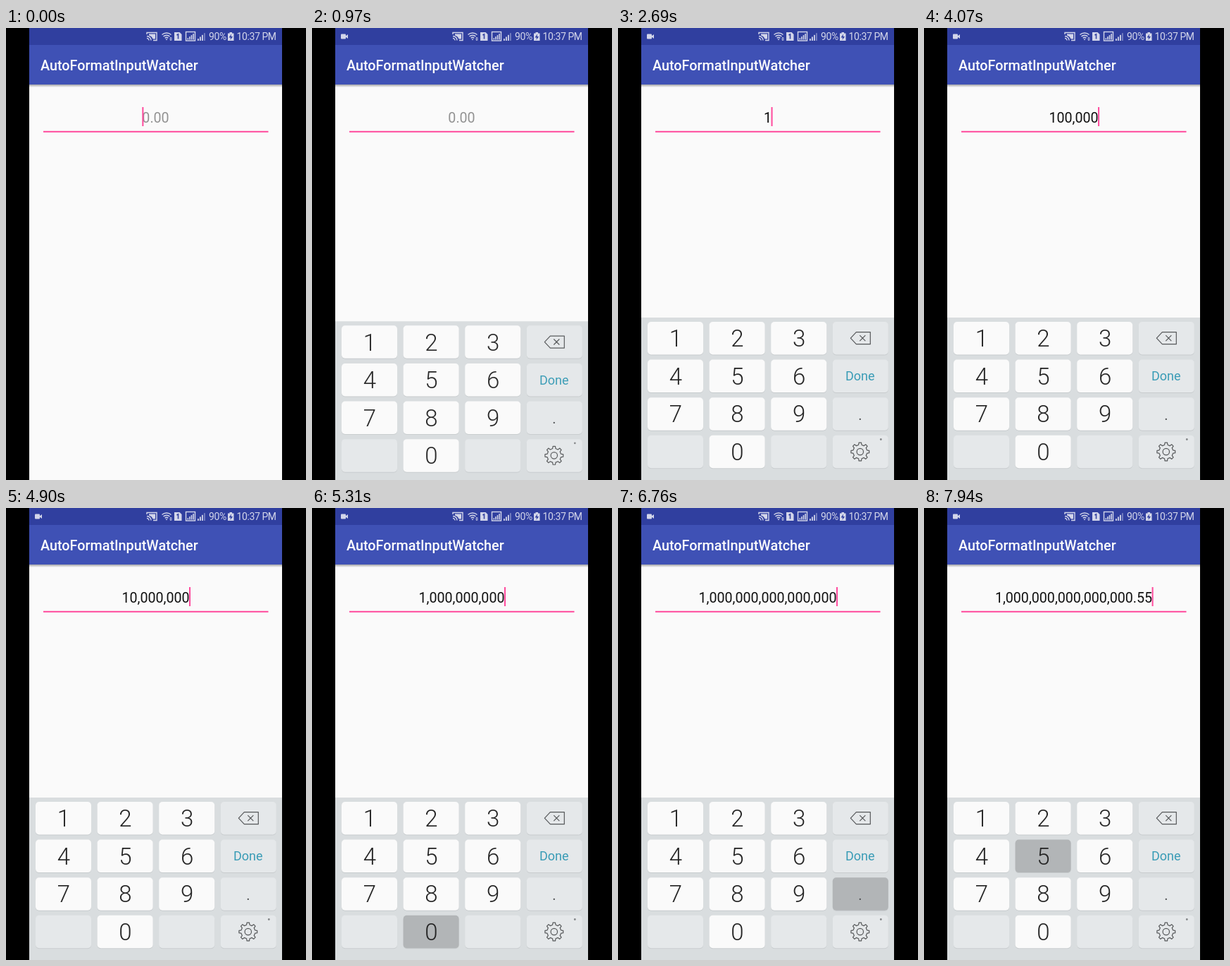
Write an HTML page that moves like this. It is 426 px wide and 640 px high and loops after 8000 ms.

```html
<!DOCTYPE html>
<html lang="en">
<head>
<meta charset="utf-8">
<title>AutoFormatInputWatcher</title>
<style>
  html, body { margin: 0; width: 100%; height: 100%; overflow: hidden; background: #000; }
  svg { display: block; width: 426px; height: 640px; }
  text { font-family: Roboto, sans-serif; }
  .status { font-size: 14px; letter-spacing: -.4px; fill: #d3d6ea; }
  .title { font-size: 19.8px; font-weight: 500; fill: #fcfcfc; }
  .mid { text-anchor: middle; }
  .digit { font-size: 33px; font-weight: 300; fill: #252525; }
  .done { font-size: 18px; fill: #3a9cb6; }
  .point { font-size: 20px; fill: #4a4c4e; }
  .line { fill: none; stroke: #56585a; stroke-width: 1.2; stroke-linejoin: round; }
  .icon { fill: none; stroke: #d3d6ea; stroke-width: 1.4; }
  .solid { fill: #d3d6ea; }
  .accent { fill: #ff4a9c; }
</style>
</head>
<body>
<svg viewBox="0 0 426 640">
  <defs>
    <linearGradient id="shade" x2="0" y2="1">
      <stop offset="0" stop-color="#85858a" stop-opacity=".75"/>
      <stop offset="1" stop-color="#85858a" stop-opacity="0"/>
    </linearGradient>
    <clipPath id="screen"><rect x="33" width="359" height="640"/></clipPath>
  </defs>
  <rect width="426" height="640"/>
  <g clip-path="url(#screen)">
    <rect x="33" width="359" height="640" fill="#fafafa"/>
    <rect x="33" width="359" height="24" fill="#303f9f"/>
    <rect x="33" y="24" width="359" height="56" fill="#3f51b5"/>
    <rect x="33" y="80" width="359" height="4" fill="url(#shade)"/>

    <g id="camera" class="solid">
      <rect x="41" y="8.5" width="7" height="7" rx="1"/>
      <path d="M47 12l4-3v6z"/>
    </g>
    <path class="icon" d="M200 9V6.5h14v11h-5M200 11.5a6 6 0 0 1 6 6M200 14.5a3 3 0 0 1 3 3"/>
    <path class="solid" d="M203 8.5h9v7h-3.5a8 8 0 0 0-5.5-5z"/>
    <path class="icon" d="M221.5 9.5a9.5 9.5 0 0 1 13 0M223.5 12a6.5 6.5 0 0 1 9 0M225.7 14.3a3.5 3.5 0 0 1 4.6 0"/>
    <path class="solid" d="M226.5 15.5h3l-1.5 2zM232 15l2-2 2 2zM232 16l2 2 2-2z"/>
    <path class="solid" d="M239 6h7.5l3 3v9H239z"/>
    <path d="M242.5 10l2-1.2V15.5" fill="none" stroke="#303f9f" stroke-width="1.5"/>
    <rect class="icon" x="255.5" y="5.5" width="13" height="12.5" stroke-width="1"/>
    <g id="bars" class="solid"></g>
    <text class="status" x="288" y="17">90%</text>
    <path class="solid" d="M317.5 6h3.5v1.5h2.5V18h-8.5V7.5h2.5z"/>
    <path d="M320 8.5l-3.5 5h2.5l-.5 3.5 3.5-5h-2.5z" fill="#303f9f"/>
    <text class="status" x="327.5" y="17">10:37 PM</text>

    <text class="title" x="49" y="60">AutoFormatInputWatcher</text>
    <text id="field" class="mid" x="212.5" y="133.5" font-size="19.65"></text>
    <rect class="accent" x="53" y="145.8" width="319.5" height="2"/>
    <rect id="caret" class="accent" y="112" width="2" height="27"/>

    <g id="pad">
      <rect x="33" y="410" width="359" height="300" fill="#d9dddf"/>
    </g>
  </g>
</svg>
<script>
const LOOP = 8000, MID = 212.5;
const $ = id => document.getElementById(id);

// key, pressed, committed, released
const TAPS = [
  ['1', 2140, 2210, 2280], ['0', 2760, 2830, 2900], ['0', 3040, 3100, 3170],
  ['0', 3240, 3240, 3310], ['0', 3800, 3870, 3930], ['0', 4000, 4000, 4070],
  ['0', 4140, 4280, 4350], ['0', 4560, 4560, 4900], ['0', 4970, 5040, 5110],
  ['0', 5170, 5170, 5240], ['0', 5310, 5590, 5660], ['0', 5730, 5730, 5800],
  ['0', 5860, 5860, 5930], ['0', 6000, 6000, 6070], ['0', 6210, 6280, 6420],
  ['0', 6490, 6550, 6690], ['.', 6760, 6900, 6970], ['5', 7520, 7590, 7660],
  ['5', 7800, 7940, 8000]
];
const CARET_OFF = [[480, 1040], [1590, 2140], [3800, 3870], [7520, 7590]];
const ROWS = ['123<', '456D', '789.', ' 0 *'];

function add(parent, tag, attrs, text) {
  const el = document.createElementNS('http://www.w3.org/2000/svg', tag);
  for (const k in attrs) el.setAttribute(k, attrs[k]);
  if (text) el.textContent = text;
  return parent.appendChild(el);
}

function gearPath(cx, cy) {
  const pts = [];
  for (let i = 0; i < 8 * 4; i++) {
    const r = i % 4 < 2 ? 13 : 10;
    const a = (Math.floor(i / 4) + [-.17, .17, .28, .72][i % 4]) * Math.PI / 4 - Math.PI / 2;
    pts.push((cx + r * Math.cos(a)).toFixed(1) + ' ' + (cy + r * Math.sin(a)).toFixed(1));
  }
  return 'M' + pts.join('L') + 'Z';
}

function drawLabel(pad, label, cx, cy) {
  if (label === '<') {
    add(pad, 'path', { class: 'line', d: `M${cx - 14} ${cy}l8-8.5h20v17h-20zM${cx - 1} ${cy - 4}l8 8m0-8l-8 8` });
  } else if (label === '*') {
    add(pad, 'path', { class: 'line', d: gearPath(cx - .5, cy) });
    add(pad, 'circle', { class: 'line', cx: cx - .5, cy, r: 4.7 });
    add(pad, 'circle', { cx: cx + 29, cy: cy - 17.5, r: 1.4, fill: '#85878a' });
  } else if (label === 'D') {
    add(pad, 'text', { class: 'mid done', x: cx - .5, y: cy + 6.5 }, 'Done');
  } else if (label === '.') {
    add(pad, 'text', { class: 'mid point', x: cx - .5, y: cy + 8.5 }, '.');
  } else if (label !== ' ') {
    add(pad, 'text', { class: 'mid digit', x: cx + .4, y: cy + 12 }, label);
  }
}

const keys = {};
const baseFill = label => /\d/.test(label) ? '#fafafa' : '#e5e8ea';

ROWS.forEach((row, r) => [...row].forEach((label, c) => {
  const x = 42 + c * 87.6, y = 416 + r * 53.6;
  const box = { x, y, width: 79, height: 46.5, rx: 5 };
  add($('pad'), 'rect', { ...box, y: y + 1, fill: '#c8ccce' });
  const cap = add($('pad'), 'rect', { ...box, fill: baseFill(label) });
  if (label !== ' ') keys[label] = cap;
  drawLabel($('pad'), label, x + 39.5, y + 23.2);
}));

for (let i = 0; i < 4; i++) {
  const h = 2.5 + i * 2.3;
  add($('bars'), 'rect', { x: 257.5 + i * 2.6, y: 16.5 - h * .9, width: 1.6, height: h * .9 });
  add($('bars'), 'rect', { x: 272 + i * 3, y: 18 - h * 1.15, width: 1.8, height: h * 1.15, opacity: i > 2 ? .45 : 1 });
}

function format(raw) {
  const [whole, ...rest] = raw.split('.');
  return [whole.replace(/\B(?=(\d{3})+$)/g, ','), ...rest].join('.');
}

let shown = null;
function setField(raw) {
  if (raw === shown) return;
  shown = raw;
  $('field').textContent = raw ? format(raw) : '0.00';
  $('field').setAttribute('fill', raw ? '#101010' : '#929292');
  const half = $('field').getComputedTextLength() / 2;
  $('caret').setAttribute('x', raw ? MID + half - .5 : MID - half);
}

// The keyboard rises a fifth of its height while it fades in.
function setPad(t) {
  const now = 900 + Math.floor((t - 900) / 66) * 66 - 826;
  const left = ms => 1 - Math.min(1, Math.max(0, now / ms));
  $('pad').setAttribute('transform', `translate(0 ${46 * left(400) ** 5})`);
  $('pad').setAttribute('opacity', t < 900 ? 0 : 1 - left(200) ** 3);
}

function render(t) {
  setField(TAPS.filter(tap => t >= tap[2]).map(tap => tap[0]).join(''));
  const held = TAPS.find(tap => t >= tap[1] && t < tap[3]);
  for (const k in keys) keys[k].setAttribute('fill', held && held[0] === k ? '#b2b5b7' : baseFill(k));
  const off = CARET_OFF.some(([from, to]) => t >= from && t < to);
  $('caret').style.visibility = off ? 'hidden' : 'visible';
  $('camera').setAttribute('opacity', t < 410 ? 0 : t < 480 ? .6 : 1);
  setPad(t);
}

const start = performance.now();
function tick() {
  render((performance.now() - start) % LOOP);
  requestAnimationFrame(tick);
}
tick();
</script>
</body>
</html>
```
